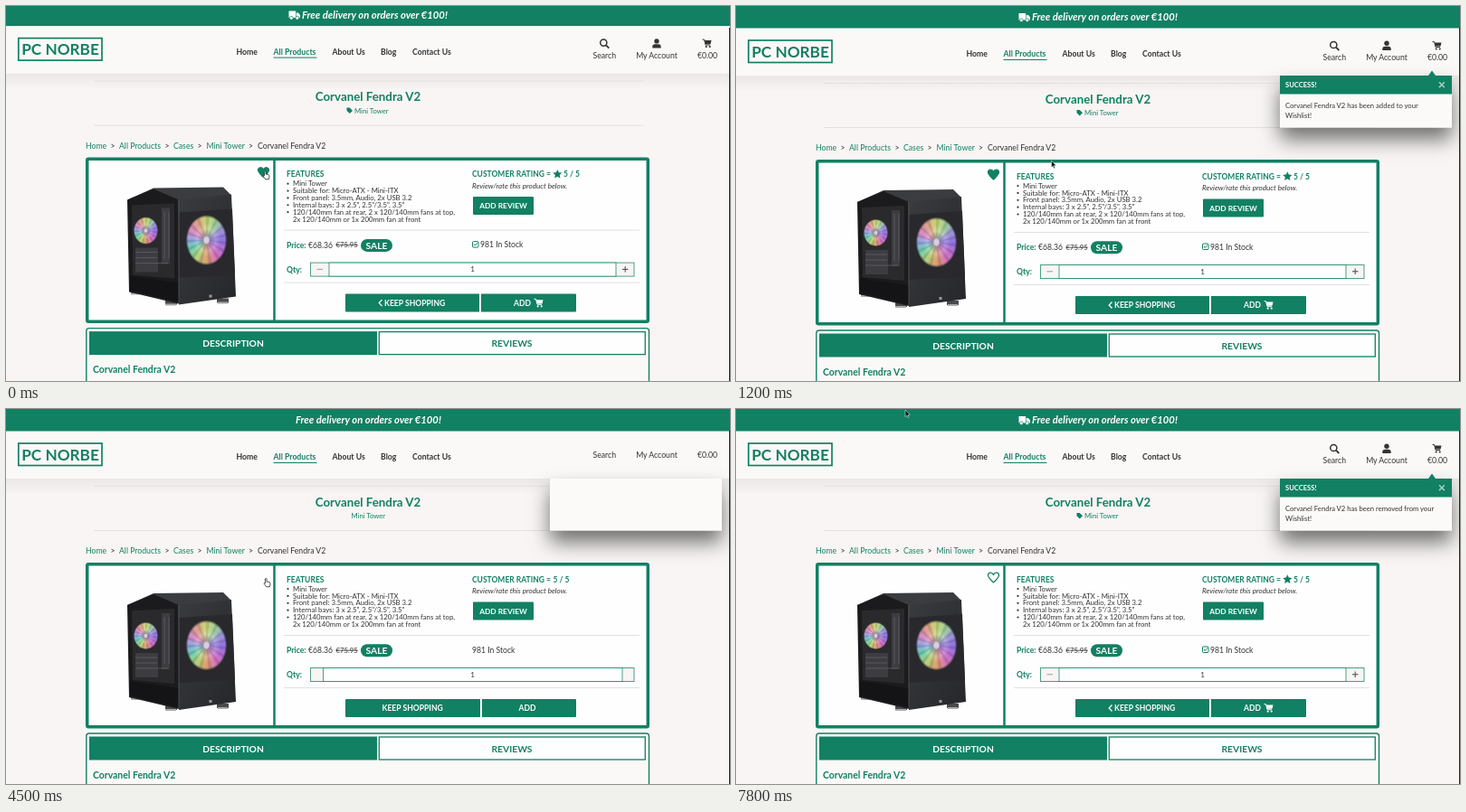
Animation of 800 by 415 pixels, one loop 7.9 s. Source, as an HTML page:

```html
<!DOCTYPE html>
<html lang="en">
<head>
<meta charset="utf-8">
<title>Product page</title>
<style>
html, body { margin: 0; width: 100%; height: 100%; overflow: hidden; background: #f8f5f4; }
#page, #page svg, #over, .fan { position: absolute; left: 0; top: 0; }
svg { display: block; overflow: visible; }
text { font-family: Lato, sans-serif; fill: #333; white-space: pre; }
.g { fill: #128063; }
.w { fill: #fff; }
.b { font-weight: 700; }
.it { font-style: italic; }
.m { text-anchor: middle; }
.o { fill: none; stroke: #128063; }
.hr { stroke: #e3e0df; }
.n, .bare .i { display: none; }
.bare .n { display: inline; }
.bare .mv { transform: translate(var(--x, 0px), var(--y, 0px)); }
.fan {
  border-radius: 50%;
  background:
    radial-gradient(closest-side, #d9cfe2 0 10%, #8a7f9a88 18% 24%, #fff3 45%, #0000 70% 90%, #2a2a2ecc 100%),
    repeating-conic-gradient(#0002 0 5deg, #0000 10deg 20deg, #0002 24deg),
    conic-gradient(#c9d977, #9fcfa0, #a08fe0, #8f74e0, #b66fd8, #d873c0, #dfa070, #b5d47c, #6fd0b0, #8fa8e0, #d98acb, #e0a08c, #c9d977);
}
</style>
</head>
<body>
<div id="page">
<svg width="800" height="415">
  <defs>
    <linearGradient id="shade" x2="0" y2="1"><stop stop-color="#eae7e6"/><stop offset="1" stop-color="#f8f5f4"/></linearGradient>
    <linearGradient id="front" x2="1" y2="1"><stop stop-color="#3a3b3e"/><stop offset="1" stop-color="#26272a"/></linearGradient>
    <filter id="drop" x="-30%" y="-40%" width="160%" height="230%"><feDropShadow dx="0" dy="13" stdDeviation="11" flood-opacity=".55"/></filter>
    <g id="cart"><path d="M-5-4.5h2l1.6 6h5" fill="none" stroke="currentColor"/><path d="M-2.7-3.6H5L4 .6h-5.6Z" fill="currentColor"/><circle cx="-.8" cy="3.5" r="1.1" fill="currentColor"/><circle cx="3.2" cy="3.5" r="1.1" fill="currentColor"/></g>
  </defs>
  <rect width="800" height="420" fill="#f8f5f4"/>
  <rect y="77" width="800" height="18" fill="url(#shade)"/>
  <rect y="24" width="800" height="53" fill="#fbf9f8"/>
  <rect y="-4" width="800" height="28.5" class="g"/>

  <g class="i w">
    <path d="M312.5 8h7.700v7.500h-7.700ZM320.800 10h2.200l2 2.500v3h-4.200Z"/>
    <g stroke="#128063" stroke-width=".7"><circle cx="315.300" cy="15.700" r="1.900"/><circle cx="321.800" cy="15.700" r="1.900"/></g>
  </g>
  <text x="327" y="16.300" font-size="11.250" class="w b it mv" style="--x:-7px">Free delivery on orders over €100!</text>

  <rect x="13.800" y="38" width="92.200" height="24.500" class="o" stroke-width="1.700"/>
  <text x="60" y="56.600" font-size="17.200" class="g b m">PC NORBE</text>
  <g font-size="8.700" class="b">
    <text x="254.500" y="56">Home</text>
    <text x="295.500" y="56" class="g">All Products</text>
    <text x="360.500" y="56">About Us</text>
    <text x="414" y="56">Blog</text>
    <text x="449" y="56">Contact Us</text>
  </g>
  <path d="M295.500 59.500h48" class="o"/>
  <g font-size="8.700" class="m mv" style="--y:-6.5px">
    <text x="661.300" y="60.200">Search</text><text x="719" y="60.200">My Account</text><text x="775" y="60.200">€0.00</text>
  </g>
  <g class="i" color="#333" fill="#333">
    <circle cx="660.300" cy="43" r="3.600" fill="none" stroke="#333" stroke-width="1.500"/><path d="m663 45.700 3.300 3.300" stroke="#333" stroke-width="1.800"/>
    <circle cx="719" cy="41.300" r="2.700"/><path d="M714.300 49v-1.500q0-2.800 2.800-2.800h3.800q2.800 0 2.800 2.800v1.500Z"/>
    <use href="#cart" x="774.500" y="44"/>
  </g>

  <path d="M97 85.500h607M97 134.500h607" class="hr"/>
  <text x="400" y="107.500" font-size="13.300" class="g b m">Corvanel Fendra V2</text>
  <path d="M376.500 115h3.200l3.300 3.300-3.200 3.200-3.300-3.300Z" class="g i"/>
  <text x="385" y="121" font-size="7.700" class="g mv" style="--x:-3.5px">Mini Tower</text>

  <g font-size="8.700">
    <text x="88" y="160" class="g">Home</text><text x="115.500" y="160">&gt;</text>
    <text x="125" y="160" class="g">All Products</text><text x="175.500" y="160">&gt;</text>
    <text x="185" y="160" class="g">Cases</text><text x="211.500" y="160">&gt;</text>
    <text x="221.500" y="160" class="g">Mini Tower</text><text x="268" y="160">&gt;</text>
    <text x="278" y="160">Corvanel Fendra V2</text>
  </g>

  <rect x="89.700" y="171.700" width="619.600" height="180" rx="1.500" fill="#fefefe" stroke="#128063" stroke-width="3.500"/>
  <path d="M296.500 171v180" class="o" stroke-width="2.500"/>

  <!-- computer case -->
  <path d="M138 317h9v4h-9ZM176 328h13v5h-13ZM233 326h13v5h-13Z" fill="#4a4a4d"/>
  <path d="M138 320h9v2h-9ZM176 332h12v2h-12ZM234 330h11v2h-11Z" fill="#aaa"/>
  <path d="M134 217 163 204 240 203 249 212 191 218Z" fill="#3b3c3f"/>
  <path d="M134 217 163 205 191 217V332L136 319Z" fill="#1b1b1e"/>
  <path d="M139 223 186 221V304L140 300Z" fill="#2a2a2d"/>
  <path d="M143 270h25v27h-25ZM172 226h9v62h-9Z" fill="#3c3c41"/>
  <path d="M143 275h24M143 281h24M143 287h36M175 230v52M180 230v52" stroke="#66666b" stroke-width=".7"/>
  <path d="M137 301 191 309V330L137 317Z" fill="#141416"/>
  <path d="M190 217 249 211 254 324 191 333Z" fill="url(#front)"/>
  <path d="M191 231 250 227 253 300 191 303Z" fill="#29292d"/>
  <path d="M191 217V332" stroke="#55565a" stroke-width=".8"/>
  <rect x="224.500" y="322" width="3" height="3" fill="#999"/>

  <path id="heart" class="i" transform="translate(284.500 186.400)" stroke="#128063" stroke-width="1.300"
    d="M0 5.500C-1.500 4.500-6-.5-6-2.200-6-5.600-1.800-6.500 0-3 1.800-6.500 6-5.600 6-2.200 6-.5 1.500 4.500 0 5.500Z"/>

  <text x="310" y="191.500" font-size="8.500" class="g b">FEATURES</text>
  <g id="list" font-size="7.750"></g>
  <g font-size="8.500" class="b">
    <text x="515" y="191.500" class="g">CUSTOMER RATING =</text>
    <text x="616" y="191.500" class="g mv" style="--x:-11.5px">5 / 5</text>
  </g>
  <path d="m609.300 183.300 1.500 3.300 3.600.4-2.700 2.400.8 3.600-3.200-1.800-3.200 1.800.8-3.600-2.700-2.400 3.600-.4Z" class="g i"/>
  <text x="515" y="204.300" font-size="8.050" class="it">Review/rate this product below.</text>
  <rect x="516" y="213.500" width="67" height="20" rx="1" class="g"/>
  <text x="549.500" y="226.600" font-size="8.400" class="w b m">ADD REVIEW</text>

  <path d="M307 250.500h393M307 308.500h393" class="hr"/>
  <g font-size="8.600">
    <text x="310" y="270" class="g b">Price:</text>
    <text x="334" y="270">€68.36</text>
    <text x="364.500" y="269.800" font-size="7.700" text-decoration="line-through">€75.95</text>
    <text x="524" y="269.700" class="mv" style="--x:-9px">981 In Stock</text>
    <text x="310" y="297" class="g b">Qty:</text>
  </g>
  <rect x="392" y="260.300" width="35" height="14" rx="7" class="g"/>
  <text x="409.500" y="271" font-size="10.300" class="w b m">SALE</text>
  <g class="i o"><rect x="515.500" y="263" width="6.500" height="6.500" rx="1"/><path d="m517 266 1.300 1.500 2.500-3"/></g>

  <g stroke="#128063" stroke-opacity=".75" fill="#fefefe">
    <rect x="336.500" y="286.500" width="357.500" height="15" fill="#f8f5f4"/>
    <rect class="i" x="357" y="286.500" width="317" height="15"/>
    <rect class="n" x="350.500" y="286.500" width="330.500" height="15"/>
  </g>
  <g class="i"><path d="M343.500 293.800h6.500" stroke="#999"/><path d="M681 293.800h6.500M684.200 290.500v6.500" stroke="#444"/></g>
  <text x="515.500" y="296.700" font-size="8" class="m">1</text>

  <rect x="375" y="321" width="255" height="20" rx="1" class="g"/>
  <rect x="523" y="320" width="2" height="22" fill="#fefefe" class="mv" style="--x:1px"/>
  <g font-size="8.600" class="b">
    <text x="418" y="334.200" class="w mv" style="--x:-2.5px">KEEP SHOPPING</text>
    <text x="561" y="334.200" class="w mv" style="--x:5.5px">ADD</text>
  </g>
  <g class="i" color="#fff"><path d="m415.500 327.500-3.300 3.500 3.300 3.500" fill="none" stroke="#fff" stroke-width="1.300"/><use href="#cart" x="588.500" y="331.200"/></g>

  <rect x="88.800" y="359" width="621.700" height="90" rx="3" fill="#fbf9f8" stroke="#128063" stroke-width="1.400"/>
  <rect x="92" y="362.500" width="318" height="26" class="g"/>
  <rect x="412.300" y="363" width="294" height="25" fill="#fefefe" stroke="#128063" stroke-width="1.300"/>
  <g font-size="10.300" class="b m">
    <text x="251" y="379.500" class="w">DESCRIPTION</text>
    <text x="559" y="379.500" class="g">REVIEWS</text>
  </g>
  <text x="96" y="408.700" font-size="10.450" class="g b">Corvanel Fendra V2</text>

  <g id="toast">
    <rect x="601" y="77" width="190" height="57.500" fill="#fcfaf9" filter="url(#drop)"/>
    <g class="i">
      <path d="M601 77h164l4-5.500 4 5.500h18v20.500H601Z" class="g"/>
      <text x="607" y="90.300" font-size="7.600" class="w b">SUCCESS!</text>
      <path d="m777 84.300 5.800 5.800m0-5.800-5.800 5.800" stroke="#a3cdc0" stroke-width="1.500"/>
      <g font-size="7.650"><text id="note" x="607" y="113.200"></text><text x="607" y="124.300">Wishlist!</text></g>
    </g>
  </g>
</svg>
<div class="fan" style="left:199px;top:234px;width:45px;height:55px"></div>
<div class="fan" style="left:141px;top:236px;width:27px;height:30px"></div>
</div>

<svg id="over" width="800" height="415">
  <path d="M799.500 24V415" stroke="#222"/>
  <path id="arrow" d="M0 0V7.500L1.800 6 2.900 8.600 4.100 8.100 3 5.500 5.300 5.300Z" fill="#111" stroke="#fff" stroke-width=".5"/>
  <path id="hand" d="M.3 1Q1.200-.5 2 1V4L5 4.500Q6.300 5 6 7L5.300 9.800H1.800L-.8 6.500Q-1 5 .5 5.800Z" fill="#fff" stroke="#222" stroke-width=".8"/>
</svg>

<script>
const LOOP = 7900, STEP = 100, ADDED = 1000, REMOVED = 4500;
// pointer track: time, x, y
const track = [
  [0, 285, 182], [1100, 285, 182], [1700, 666, 117], [1900, 669, 116], [2400, 669, 116],
  [2900, 430, 325], [3200, 282, 204], [3500, 285, 189], [3800, 286, 187], [5000, 286, 187],
  [5400, 566, 107], [5800, 778, 83], [6400, 778, 83], [6700, 419, 173], [6800, 419, 173],
  [7200, 226, 37], [7400, 226, 37], [7800, 187, 1], [LOOP, 187, 1]
];
const $ = id => document.getElementById(id);
const show = (el, on) => { el.style.display = on ? '' : 'none'; };

const features = ['Mini Tower', 'Suitable for: Micro-ATX - Mini-ITX', 'Front panel: 3.5mm, Audio, 2x USB 3.2',
  'Internal bays: 3 x 2.5", 2.5"/3.5", 3.5"', '120/140mm fan at rear, 2 x 120/140mm fans at top,',
  '2x 120/140mm or 1x 200mm fan at front'];
$('list').innerHTML = features.map((line, i) => {
  const y = 201.7 + i * 7.85;
  return `<text x="317" y="${y}">${line}</text>` + (i < 5 ? `<circle cx="311.5" cy="${y - 2.6}" r="1.1" fill="#333"/>` : '');
}).join('');

function pointer(t) {
  const k = track.findIndex(p => p[0] > t);
  const [t0, x0, y0] = track[k - 1], [t1, x1, y1] = track[k];
  const u = (t - t0) / (t1 - t0);
  return [x0 + (x1 - x0) * u, y0 + (y1 - y0) * u];
}

function draw(now) {
  const t = Math.floor(now % LOOP / STEP) * STEP;
  const loading = t === ADDED || t === REMOVED;
  $('page').classList.toggle('bare', loading);
  $('page').style.transform = t < ADDED ? 'translateY(-2.4px)' : 'none';
  show($('toast'), t >= ADDED);
  $('note').textContent = 'Corvanel Fendra V2 has been ' + (t < REMOVED ? 'added to your' : 'removed from your');
  $('heart').setAttribute('fill', t < 3400 ? '#128063' : 'none');

  const [x, y] = pointer(t);
  const over = Math.abs(x - 284.5) < 8 && Math.abs(y - 187) < 9;
  show($('hand'), over);
  show($('arrow'), !over);
  $(over ? 'hand' : 'arrow').setAttribute('transform', `translate(${x} ${y})`);
  requestAnimationFrame(draw);
}
requestAnimationFrame(draw);
</script>
</body>
</html>
```
